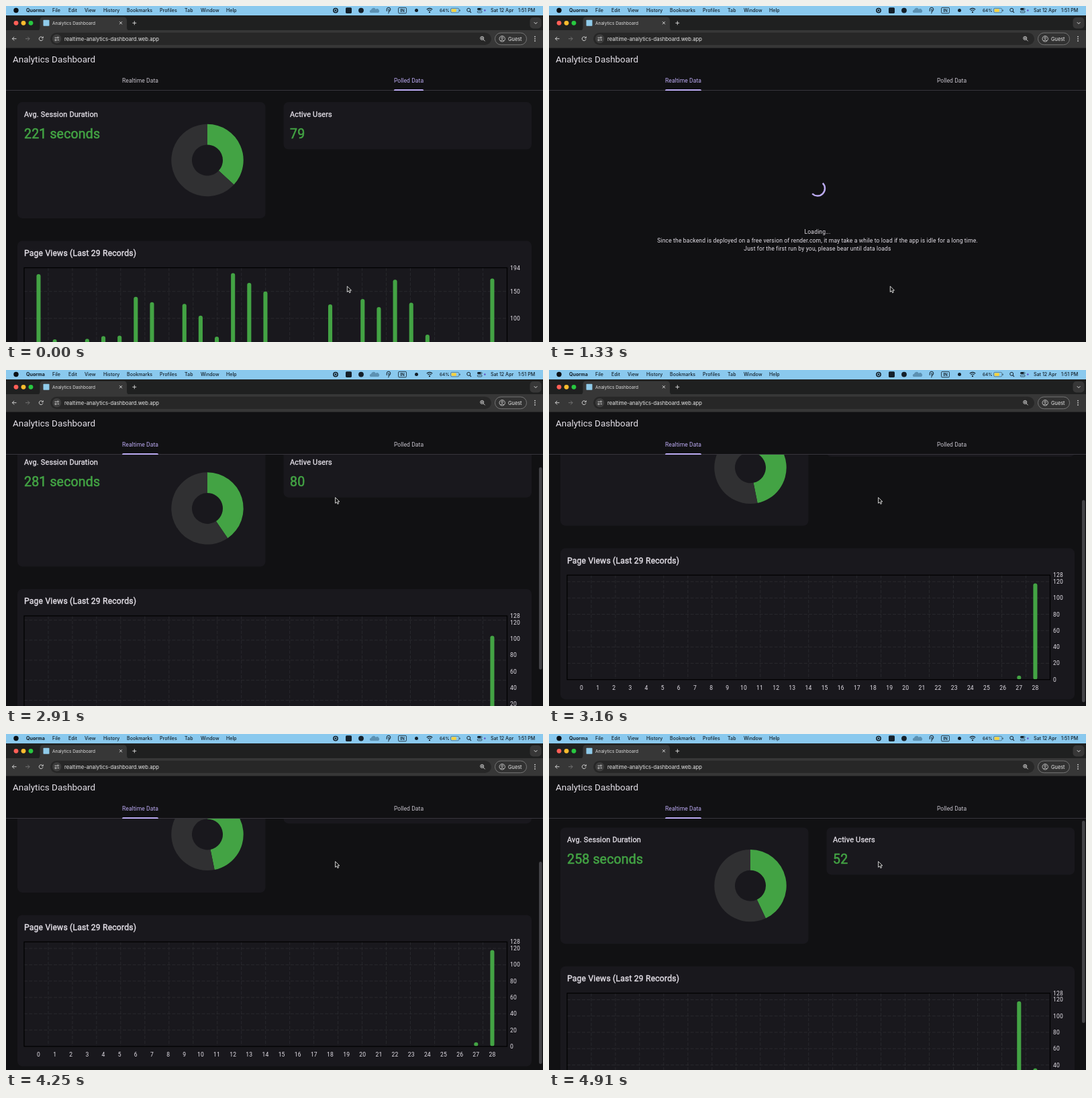
Write an HTML page that moves like this. It is 800 by 500 pixels and loops after 4990 ms.

```html
<!DOCTYPE html>
<html lang="en">
<head>
<meta charset="utf-8">
<title>Analytics Dashboard</title>
<style>
  html, body { margin: 0; width: 100%; height: 100%; overflow: hidden; background: #111113; }
  svg { display: block; width: 100vw; height: 100vh; }
  text { white-space: pre; }
  .ui { font-family: Inter, sans-serif; }
  .app { font-family: Roboto, sans-serif; }
</style>
</head>
<body>
<svg id="stage" viewBox="0 0 800 500">
  <defs>
    <clipPath id="view"><rect y="126" width="800" height="374"/></clipPath>
    <clipPath id="plot"><rect x="27" y="389.5" width="719.5" height="155.5"/></clipPath>
  </defs>
  <rect width="800" height="500" fill="#111113"/>
  <g id="app" class="app"></g>
  <g id="window" class="ui"></g>
  <path id="cursor" d="M0 0V8.6L2 6.8L3.4 9.8L4.9 9.1L3.6 6.2H6.2Z" fill="#111" stroke="#fff" stroke-width=".8" stroke-linejoin="round"/>
</svg>
<script>
const LOOP = 4990, FPS = 12;
const GREEN = '#43a344', INK = '#e4e0e8', MUTED = '#c6c2cb', ACCENT = '#bbaaf2';
const $ = id => document.getElementById(id);
const clamp = x => Math.min(1, Math.max(0, x));
const lerp = (a, b, p) => a + (b - a) * p;
const ramp = (t, start, len) => clamp((t - start) / len);
const smooth = p => p * p * (3 - 2 * p);

const rect = (x, y, w, h, fill, r = 0, extra = '') =>
  `<rect x="${x}" y="${y}" width="${w}" height="${h}" rx="${r}" fill="${fill}" ${extra}/>`;
const dot = (x, y, r, fill, extra = '') => `<circle cx="${x}" cy="${y}" r="${r}" fill="${fill}" ${extra}/>`;
const hoop = (x, y, r, color, w = 0.8) => dot(x, y, r, 'none', `stroke="${color}" stroke-width="${w}"`);
const line = (d, color, w = 1, extra = '') =>
  `<path d="${d}" fill="none" stroke="${color}" stroke-width="${w}" ${extra}/>`;
const text = (x, y, size, fill, s, extra = '') =>
  `<text x="${x}" y="${y}" font-size="${size}" fill="${fill}" ${extra}>${s}</text>`;
const body = (x, y, size, fill, s, extra = '') =>
  text(x, y, size, fill, s, `letter-spacing=".153" ${extra}`);
const heavy = (x, y, size, fill, s) =>
  body(x, y, size, fill, s, `stroke="${fill}" stroke-width="${size * 0.03}"`);
const mid = 'text-anchor="middle"';

function menuBar() {
  const k = '#14202a', sky = '#8ac9ee', round = 'stroke-linecap="round" stroke-linejoin="round"';
  const menu = [[69, 'File'], [93, 'Edit'], [117, 'View'], [145, 'History'], [180, 'Bookmarks'],
    [229, 'Profiles'], [266, 'Tab'], [290, 'Window'], [328, 'Help'], [722, 'Sat 12 Apr'], [763, '1:51 PM']];
  return [
    rect(0, 0, 800, 14, sky),
    dot(15, 6.5, 3.7, '#0c1116'),
    text(30, 9.2, 7.1, k, 'Quorma', 'font-weight="700"'),
    ...menu.map(([x, s]) => text(x, 9.2, 7.1, k, s, 'font-weight="500"')),
    hoop(491, 6.6, 3.2, k, 1.5), dot(491, 6.6, 1.4, k),
    rect(506, 2.3, 9, 8.6, k, 1.6),
    dot(529, 6.6, 3.9, k),
    '<path d="M543 10a2.3 2.3 0 0 1 1-4.3a3.6 3.6 0 0 1 6.8-.7a2.7 2.7 0 0 1 4 5Z" fill="#5c91b2"/>',
    line('M567.2 7.5V5a2.8 2.8 0 0 1 5.6 0q0 1.7-1.4 2.8t-1.7 3M569 5.5q1-2 2 0t-1.4 2.2', k, 1, round),
    rect(584.5, 2.4, 12, 8.4, 'none', 1.5, `stroke="${k}" stroke-width=".8"`),
    text(590.5, 9.1, 6.3, k, 'IN', mid + ' font-weight="600"'),
    dot(611.5, 6.6, 2.5, k),
    line('M626.8 5.2q4.2-3.8 8.4 0M628.4 7.1q2.6-2.2 5.2 0', k, 1.2), dot(631, 9.2, 1.1, k),
    text(646, 9, 6.4, k, '64%', 'font-weight="500"'),
    rect(662.5, 3.4, 12.4, 6.4, 'none', 1.8, `stroke="${k}" stroke-width=".6" opacity=".7"`),
    rect(663.6, 4.4, 7.2, 4.4, '#f8d23c', 1), rect(675.5, 5.5, 1, 2.2, k, 0.5),
    hoop(689.2, 5.9, 2.5, k, 1), line('M691 7.8L693 10', k, 1.1),
    rect(702, 3, 7.4, 3, k, 1.5), rect(702.3, 7.3, 6.8, 2.6, 'none', 1.3, `stroke="${k}" stroke-width=".7"`),
    dot(708, 4.5, 0.9, sky), dot(713.3, 6.6, 1.3, '#6355c8'),
  ].join('');
}

function browser() {
  const w = '#dedede', tool = '#373737';
  return [
    rect(0, 14, 800, 23, '#1f2020', 3),
    ...['#ff5f57', '#febc2e', '#28c840'].map((c, i) => dot(15 + 11 * i, 25.3, 3.4, c)),
    `<path d="M46 36.5q4.5 0 4.5-4.5v-10.5q0-5 5-5h119.5q5 0 5 5v10.5q0 4.5 4.5 4.5Z" fill="${tool}"/>`,
    rect(55.5, 20.8, 9, 9, '#8fcbea', 0.8),
    text(69, 27.6, 6.55, w, 'Analytics Dashboard'),
    line('M169 23.2l4 4m0-4l-4 4M188.4 25.3h5.8m-2.9-2.9v5.8', w, 0.9),
    rect(780.5, 17, 17, 16.5, tool, 5), line('M786.8 24.2l2.3 2.3l2.3-2.3', w),
    rect(0, 36, 800, 26.5, tool),
    line('M15.5 48.7h-6m2.7-2.8l-2.8 2.8l2.8 2.8', w, 0.9),
    line('M29 48.7h6m-2.7-2.8l2.8 2.8l-2.8 2.8', '#777', 0.9),
    line('M54.6 47.1a2.9 2.9 0 1 0 .4 2.3M55.3 45.4v2.2h-2.2', w, 0.9),
    rect(66, 39.7, 657, 18.3, '#272727', 9.15),
    dot(75.7, 48.8, 6.7, '#3d3d3d'),
    line('M72.6 47.2h3M76.5 50.6h2.6', w, 0.9),
    hoop(77.4, 47.2, 1.1, w), hoop(74, 50.6, 1.1, w),
    text(87, 51.5, 7.7, '#e8e8e8', 'realtime-analytics-dashboard.web.app'),
    hoop(709.2, 47.9, 2.5, w, 0.9),
    line('M711 49.7l2.6 2.6M708 47.9h2.4M709.2 46.7v2.4', w, 0.9),
    rect(728.5, 40, 47, 17.7, '#323232', 8.85, 'stroke="#858585" stroke-width=".8"'),
    hoop(739.2, 48.8, 4.2, w), hoop(739.2, 47.5, 1.4, w),
    line('M736.5 51.7q2.7-2.3 5.4 0', w, 0.8),
    text(748, 51.5, 7.4, '#e8e8e8', 'Guest'),
    ...[45.7, 48.8, 51.9].map(y => dot(788, y, 0.85, w)),
  ].join('');
}

// Ring segment between two clockwise angles in turns from the top
function ring(from, to, fill) {
  const at = (r, turn) => {
    const a = turn * 2 * Math.PI;
    return `${300 + r * Math.sin(a)} ${229.5 - r * Math.cos(a)}`;
  };
  const big = +(to - from > 0.5), R = 53.7, r = 23;
  return `<path fill="${fill}" d="M${at(R, from)}A${R} ${R} 0 ${big} 1 ${at(R, to)}` +
    `L${at(r, to)}A${r} ${r} 0 ${big} 0 ${at(r, from)}Z"/>`;
}

function chart({ bars, max, top, step }) {
  const base = 545, height = 155.5;
  const rule = d => line(d, '#303034', 0.7, 'stroke-dasharray="4.9 2.45"');
  const label = v => body(751, base - v / top * height + 3.05, 8.55, INK, v);
  let grid = '', rods = '', labels = label(top);
  for (let i = 1; i < 20; i++) grid += rule(`M${27 + i * 35.97} 389.5V545`);
  for (let v = step; v < max; v += step) grid += rule(`M27 ${base - v / max * height}H746.5`);
  for (const [i, v] of Object.entries(bars)) {
    const h = Math.max(6.1, v / max * height);
    if (v > 0) rods += rect(45.45 + i * 24.14, base - h, 6.1, h, GREEN, 3.05);
  }
  for (let v = 0; v < top; v += step) labels += label(v);
  for (let i = 0; i < 29; i++) labels += body(48.5 + i * 24.14, 560, 8.55, INK, i, mid);
  return `<g clip-path="url(#plot)">${grid}</g>` + rods +
    rect(27, 389.5, 719.5, height, 'none', 0, 'stroke="#000" stroke-width="1.2"') + labels;
}

function panels(d) {
  const card = (x, y, w, h) => rect(x, y, w, h, '#19181d', 7.3);
  return card(17, 143, 369.5, 173) + card(413.5, 143, 369.5, 70.3) + card(17, 349.5, 766, 225) +
    heavy(27, 164.5, 11, INK, 'Avg. Session Duration') +
    heavy(27, 197, 19.55, GREEN, d.seconds + ' seconds') +
    heavy(423, 164.5, 11, INK, 'Active Users') +
    heavy(423, 197, 19.55, GREEN, d.users) +
    ring(0, d.pie / 600, GREEN) + ring(d.pie / 600, 1, '#303032') +
    heavy(27, 371.9, 12.22, INK, 'Page Views (Last 29 Records)') + chart(d);
}

function loading(t) {
  const start = -45 + (t - 1.333) * 220, sweep = 180 + (t - 1.333) * 120;
  const at = deg => {
    const a = deg * Math.PI / 180;
    return `${400 + 11 * Math.cos(a)} ${271.5 + 11 * Math.sin(a)}`;
  };
  const lines = ['Loading...',
    'Since the backend is deployed on a free version of render.com, it may take a while to load if the app is idle for a long time.',
    'Just for the first run by you, please bear until data loads'];
  return line(`M${at(start)}A11 11 0 ${+(sweep > 180)} 1 ${at(start + sweep)}`, ACCENT, 2.44) +
    lines.map((s, i) => body(400, 339.3 + i * 12.22, 8.55, INK, s, mid)).join('');
}

const polled = {
  seconds: 221, users: 79, pie: 221, max: 194, top: 194, step: 50,
  bars: { 0: 182, 1: 61, 3: 62, 4: 67, 5: 68, 6: 140, 7: 130, 9: 127, 10: 105, 11: 66, 12: 184, 13: 166,
    14: 150, 18: 126, 20: 136, 21: 121, 22: 172, 23: 129, 24: 70, 28: 174 },
};

// Live updates: arrival time and start of each 150 ms transition
const updates = [
  { at: 1.4, seconds: 224, users: 44, views: [0, 0, 4], top: 14, step: 2 },
  { at: 2.79, seconds: 281, users: 80, views: [0, 4, 118], top: 128, step: 20, axis: 2.798, rods: 2.811, pie: 2.867 },
  { at: 4.366, seconds: 258, users: 52, views: [4, 118, 36], top: 128, step: 20, axis: 4.366, rods: 4.366, pie: 4.366 },
];

function live(t) {
  const n = updates.filter(u => t >= u.at).length - 1;
  if (n < 0) return loading(t);
  const now = updates[n], old = updates[Math.max(0, n - 1)];
  const ease = start => start ? ramp(t, start, 0.15) : 1;
  const bars = {};
  now.views.forEach((v, i) => bars[26 + i] = lerp(old.views[i], v, ease(now.rods)));
  return panels({ ...now, bars,
    pie: lerp(old.seconds, now.seconds, ease(now.pie)),
    max: lerp(old.top, now.top, ease(now.axis)) });
}

function mix(a, b, p) {
  const part = (c, i) => parseInt(c.slice(1 + i * 2, 3 + i * 2), 16);
  return `rgb(${[0, 1, 2].map(i => Math.round(lerp(part(a, i), part(b, i), p)))})`;
}

function draw(t) {
  const swipe = smooth(ramp(t, 0.36, 0.72));
  const scroll = 91 * (smooth(ramp(t, 2.75, 0.5)) - smooth(ramp(t, 4.032, 1.01)));
  const half = lerp(22.2, 27, swipe), cx = lerp(600, 200, swipe);
  const tab = (x, s, on) => text(x, 114, 8.55, mix(MUTED, ACCENT, on), s, mid + ' letter-spacing=".06"');
  const page = (x, y, s) => `<g transform="translate(${x} ${y})">${s}</g>`;
  let out = text(10, 83.5, 13.44, INK, 'Analytics Dashboard') +
    tab(200, 'Realtime Data', swipe) + tab(600, 'Polled Data', 1 - swipe) +
    rect(0, 125.2, 800, 0.7, '#48454e') +
    `<path d="M${cx - half} 125.9v-.2q0-1.8 1.8-1.8H${cx + half - 1.8}q1.8 0 1.8 1.8v.2Z" fill="${ACCENT}"/>` +
    '<g clip-path="url(#view)">';
  if (swipe < 1) out += page(800 * swipe, 0, panels(polled));
  if (swipe > 0) out += page(800 * (swipe - 1), -scroll, live(t));
  out += rect(794, 126 + 0.8 * scroll, 4.6, 301, '#434347', 2.3, `opacity="${ramp(t, 2.75, 0.12)}"`) + '</g>';
  $('app').innerHTML = out;
  const move = smooth(ramp(t, 2.16, 0.5));
  $('cursor').setAttribute('transform', `translate(${lerp(508.3, 490.6, move)} ${lerp(417, 189.7, move)})`);
}

$('window').innerHTML = menuBar() + browser();
const begin = performance.now();
let last = -1;
function tick() {
  const ms = (performance.now() - begin) % LOOP;
  const step = Math.floor((ms + 8) * FPS / 1000);
  const shown = step < 5 ? 0 : Math.min(step, 59);
  if (shown !== last) draw((last = shown) / FPS);
  requestAnimationFrame(tick);
}
tick();
</script>
</body>
</html>
```
